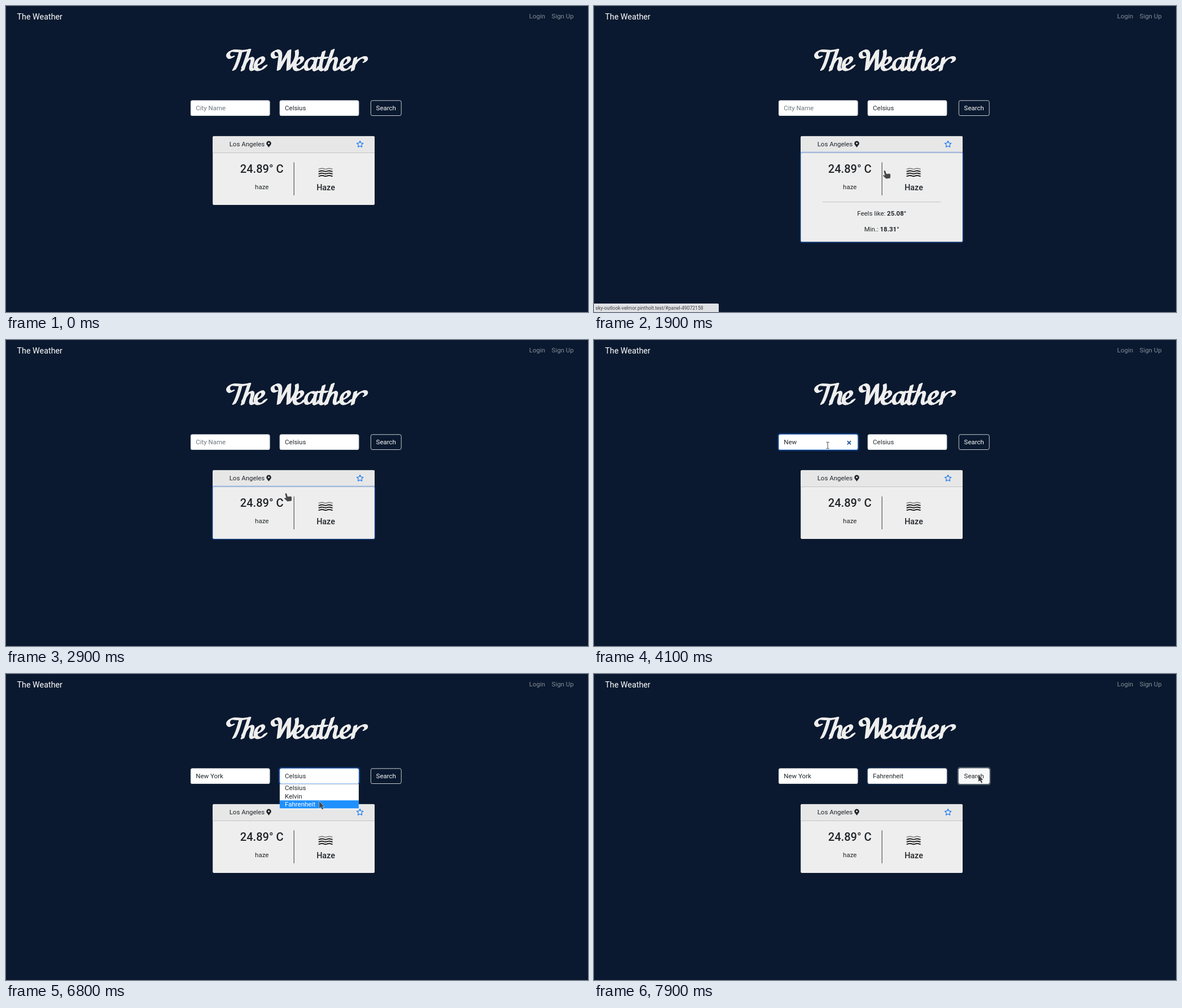
Recreate the animation shown at these times as an HTML page with a canvas. Size 1031 by 543 pixels, loop 8000 ms.

```html
<!DOCTYPE html>
<html lang="en">
<head>
<meta charset="utf-8">
<title>The Weather</title>
<style>
html, body { margin: 0; width: 100%; height: 100%; overflow: hidden; background: #0a192f; }
canvas { display: block; }
</style>
</head>
<body>
<canvas id="stage" width="1031" height="543"></canvas>
<script>
const ctx = document.getElementById('stage').getContext('2d');
const LOOP = 8000, STEP = 100, ZOOM = 0.716;
const NAVY = '#0a192f', INK = '#212529', PAPER = '#eeeeee';

const clamp = v => Math.max(0, Math.min(1, v));
const ramp = (t, start, length) => clamp((t - start) / length);
const ease = v => v * v * (3 - 2 * v);
const fade = (t, on, off, length = 150) => ramp(t, on, length) - ramp(t, off, length);

// Font sizes are page pixels; the page is shown at ZOOM.
function text(str, x, y, { size = 16, color = INK, weight = 400, align = 'left' } = {}) {
  ctx.save();
  ctx.translate(x, y);
  ctx.scale(ZOOM, ZOOM);
  ctx.font = `${weight} ${size}px Roboto, sans-serif`;
  ctx.fillStyle = color;
  ctx.textAlign = align;
  ctx.fillText(str, 0, 0);
  ctx.restore();
}

function textWidth(str, weight) {
  ctx.font = `${weight} 16px Roboto, sans-serif`;
  return ctx.measureText(str).width * ZOOM;
}

// The border lies inside the box.
function box(x, y, w, h, r, fill, border) {
  ctx.beginPath();
  ctx.roundRect(x, y, w, h, r);
  ctx.fillStyle = fill;
  ctx.fill();
  if (!border) return;
  ctx.beginPath();
  ctx.roundRect(x + 0.4, y + 0.4, w - 0.8, h - 0.8, r);
  ctx.strokeStyle = border;
  ctx.lineWidth = 0.8;
  ctx.stroke();
}

function ring(x, y, w, h, alpha, rgb = '20,100,230', strength = 0.3) {
  if (alpha <= 0) return;
  ctx.beginPath();
  ctx.roundRect(x - 2.3, y - 2.3, w + 4.6, h + 4.6, 4.5);
  ctx.roundRect(x, y, w, h, 2.5);
  ctx.fillStyle = `rgba(${rgb},${strength * alpha})`;
  ctx.fill('evenodd');
}

// Script lettering: skeleton strokes drawn with a broad, tilted nib.
const GLYPHS = {
  T: 'M402 90C396 95 391 88 395 83C399 77 408 80 416 80C422 80 427 79 430 78M416 80C413 92 410 104 404 113',
  h: 'M431 78L419 114M420 108C425 98 432 90 436 93C439 96 434 103 434 109C434 115 439 115 443 108',
  e: 'M444 105C452 104 458 96 455 92.5C451 89 442 96 442 106C442 115 451 117 460 106',
  W: 'M479 91C472 93 470 84 475 81C481 77 486 80 486 88L483 113L502 79L500 113C508 103 518 92 515 79',
  a: 'M547 94C539 89 531 98 531 107C531 116 540 115 546 103M550 92C547 101 546 108 546 111C546 116 552 114 555 107',
  t: 'M563 81C560 92 557 103 557 109C557 116 564 115 569 107M554 92H568',
  r: 'M619 92L614 114M617 104C623 94 632 89 637 92C639 94 638 97 635 99'
};
const TITLE = [['T', 0], ['h', 0], ['e', 0], ['W', 0], ['e', 69], ['a', 0], ['t', 0],
  ['h', 148], ['e', 152], ['r', 0]].map(([g, dx]) => [new Path2D(GLYPHS[g]), dx]);

function drawTitle() {
  ctx.save();
  ctx.strokeStyle = '#eeeeee';
  ctx.lineWidth = 1.8;
  ctx.lineCap = ctx.lineJoin = 'round';
  for (const [path, dx] of TITLE) {
    for (let k = -5; k <= 5; k++) {
      ctx.save();
      ctx.translate(dx + k * 0.5, -k * 0.23);
      ctx.stroke(path);
      ctx.restore();
    }
  }
  ctx.restore();
}

function drawNav() {
  const dim = { color: '#858c97' };
  text('The Weather', 19.5, 23.5, { size: 20, color: '#fff' });
  text('Login', 926.8, 22.4, dim);
  text('Sign Up', 966.6, 22.4, dim);
}

function field(x, label, color, focus) {
  ring(x, 167.4, 140.4, 27.5, focus);
  box(x, 167.4, 140.4, 27.5, 2.9, '#fff', focus > 0.5 ? '#80bdff' : '#ced4da');
  text(label, x + 9.3, 185.1, { color });
}

const TYPED = [[3900, 1], [4100, 3], [4300, 4], [4500, 5], [4700, 6], [4900, 7], [5000, 8]];

function drawForm(t) {
  const focusCity = fade(t, 3250, 6250);
  const focusUnit = fade(t, 6400, 7800);
  const count = TYPED.reduce((n, [at, len]) => t >= at ? len : n, 0);
  if (count) field(327, 'New York'.slice(0, count), INK, focusCity);
  else field(327, 'City Name', '#6c757d', focusCity);
  if (count && focusCity > 0.5) {
    ctx.strokeStyle = '#2f5f9e';
    ctx.lineWidth = 2;
    ctx.stroke(new Path2D('M448.8 179.2L455 185.4M455 179.2L448.8 185.4'));
  }

  field(484.8, t >= 7100 ? 'Fahrenheit' : 'Celsius', INK, focusUnit);

  const hover = ramp(t, 7600, 200);
  ring(645.9, 167.4, 54.7, 27.5, ramp(t, 7800, 150), '248,249,250', 0.4);
  box(645.9, 167.4, 54.7, 27.5, 2.9, `rgba(248,249,250,${hover})`, '#f8f9fa');
  text('Search', 673.2, 185.1, { color: hover > 0.5 ? INK : '#f8f9fa', align: 'center' });
}

function drawMenu(t) {
  if (t < 6500 || t >= 7100) return;
  const active = t < 6600 ? 0 : t < 6700 ? 1 : 2;
  box(484.9, 195.2, 140, 44.7, 0, '#fff');
  ['Celsius', 'Kelvin', 'Fahrenheit'].forEach((name, i) => {
    const y = 195.5 + i * 14.35;
    if (i === active) box(484.9, y, 140, 14.4, 0, '#1e90ff');
    text(name, 494.1, y + 10.9, { color: i === active ? '#fff' : INK });
  });
}

function drawIcons() {
  // map pin
  ctx.fillStyle = INK;
  ctx.fill(new Path2D('M465.5 251C464 248 461.2 246.5 461.2 243.7A4.3 4.3 0 0 1 469.8 243.7C469.8 246.5 467 248 465.5 251ZM465.5 242.2a1.5 1.5 0 1 0 0.01 0Z'), 'evenodd');

  // star
  ctx.beginPath();
  for (let i = 0; i < 10; i++) {
    const a = i * Math.PI / 5 - Math.PI / 2, r = i % 2 ? 3 : 5.9;
    ctx.lineTo(627.1 + r * Math.cos(a), 245.5 + r * Math.sin(a));
  }
  ctx.closePath();
  ctx.strokeStyle = '#1877f2';
  ctx.lineWidth = 1.25;
  ctx.lineJoin = 'round';
  ctx.stroke();

  // haze
  for (let i = 0; i < 4; i++) {
    ctx.beginPath();
    for (let x = 0; x <= 25; x++) {
      ctx.lineTo(553.6 + x, 288.8 + i * 4.2 + Math.cos(x / 25 * Math.PI * 4) * 0.6);
    }
    ctx.strokeStyle = i ? '#1c1c1c' : '#777';
    ctx.lineWidth = i ? 1.9 : 1.5;
    ctx.stroke();
  }
}

const DETAILS = [['Feels like: ', '25.08°'], ['Min.: ', '18.31°'], ['Max.: ', '38.39°'],
  ['Pressure: ', '1013'], ['Humidity: ', '63']];

function drawCard(t) {
  const open = ease(ramp(t, 1750, 350)) - ease(ramp(t, 2550, 350));
  const bottom = 353.1 + 167 * open;
  const left = 366.1, width = 287, top = 230.7, split = 260.8;

  ctx.save();
  ctx.beginPath();
  ctx.roundRect(left, top, width, bottom - top, 2.9);
  ctx.clip();
  box(left, top, width, bottom - top, 0, PAPER);
  box(left, top, width, split - top, 0, '#e7e7e7');
  box(left, split - 0.7, width, 0.8, 0, '#c4c4c4');

  text('Los Angeles', 395.7, 249.4);
  drawIcons();
  text('24.89° C', 453.2, 296.1, { size: 28, weight: 500, align: 'center' });
  text('haze', 453.2, 325.3, { align: 'center' });
  text('Haze', 566.5, 326.6, { size: 20, weight: 500, align: 'center' });
  box(509.7, 277.5, 0.9, 58.5, 0, INK);

  if (open > 0) {
    box(405, 347.3, 209.5, 0.9, 0, '#c0c0c0');
    DETAILS.forEach(([label, value], i) => {
      const y = 371.8 + i * 28.65;
      const labelWidth = textWidth(label, 400);
      const x = 509.7 - (labelWidth + textWidth(value, 700)) / 2;
      text(label, x, y);
      text(value, x + labelWidth, y, { weight: 700 });
    });
  }
  ctx.restore();
  ring(left + 0.5, split, width - 1, bottom - split - 0.6, fade(t, 1700, 3300));
}

function drawStatus(t) {
  const alpha = t < 1600 ? 0 : t < 1700 ? 0.36 : 1 - ramp(t, 2000, 200);
  if (alpha <= 0) return;
  ctx.save();
  ctx.globalAlpha = alpha;
  box(-3, 528, 224, 18, 2, '#dfe1e5');
  text('sky-outlook-velmor.pintholt.test/#panel-49072158', 2.8, 539.3, { size: 12, color: '#3c4043' });
  ctx.restore();
}

const TRACK = [
  [700, 299, 61], [1000, 380, 175], [1300, 478, 332], [1500, 514, 293], [2100, 514, 293],
  [2200, 514, 292], [2600, 514, 292], [2800, 511, 288], [2900, 495, 273], [3000, 450, 225],
  [3100, 417, 186], [3200, 417, 186], [3500, 414, 187], [5500, 414, 187], [5600, 415, 189],
  [6000, 470, 205], [6300, 563, 188], [6400, 564, 187], [6600, 562, 205], [6700, 559, 230],
  [6800, 555, 226], [7000, 555, 226], [7300, 600, 214], [7700, 678, 182], [7900, 681, 179]
];

function pointer(t) {
  const i = TRACK.findIndex(key => key[0] > t);
  if (i < 0) return TRACK[TRACK.length - 1].slice(1);
  const [t0, x0, y0] = TRACK[i - 1], [t1, x1, y1] = TRACK[i];
  const k = (t - t0) / (t1 - t0);
  return [x0 + (x1 - x0) * k, y0 + (y1 - y0) * k];
}

const ARROW = new Path2D('M0 0V12.2L2.8 9.7L5 14.6L7.2 13.6L5 8.9H8.4Z');
const HAND = new Path2D('M-0.6 0C0.5 -1.6 2 -1 2.4 0.4L3.9 5L9 4.4C10.6 4.4 11.2 5.8 11.2 7.2L10.8 12.6L3.6 13.6L-1.6 8.8C-2.4 7.4 -1.2 6.6 0 7.2L1.4 8Z');
const BEAM = new Path2D('M-2.6 -5.7H-0.8L0 -5L0.8 -5.7H2.6M0 -5V5M-2.6 5.7H-0.8L0 5L0.8 5.7H2.6');

function drawPointer(t) {
  if (t < 700) return;
  const [x, y] = pointer(t);
  const inside = (l, top, r, b) => x > l && x < r && y > top && y < b;
  ctx.save();
  ctx.translate(x, y);
  ctx.lineJoin = 'round';
  if (inside(327, 167, 467, 195)) {
    ctx.strokeStyle = '#fff';
    ctx.lineWidth = 2.4;
    ctx.stroke(BEAM);
    ctx.strokeStyle = '#444';
    ctx.lineWidth = 1;
    ctx.stroke(BEAM);
  } else {
    const shape = inside(366, 261, 653, 353) ? HAND : ARROW;
    ctx.strokeStyle = 'rgba(255,255,255,0.6)';
    ctx.lineWidth = 1.2;
    ctx.stroke(shape);
    ctx.fillStyle = '#484848';
    ctx.fill(shape);
  }
  ctx.restore();
}

function draw(t) {
  ctx.fillStyle = NAVY;
  ctx.fillRect(0, 0, 1031, 543);
  drawNav();
  drawTitle();
  drawForm(t);
  drawCard(t);
  drawMenu(t);
  drawStatus(t);
  drawPointer(t);
}

const start = performance.now();
function tick() {
  const t = (performance.now() - start) % LOOP;
  draw(Math.floor(t / STEP) * STEP);
  requestAnimationFrame(tick);
}
tick();
</script>
</body>
</html>
```
